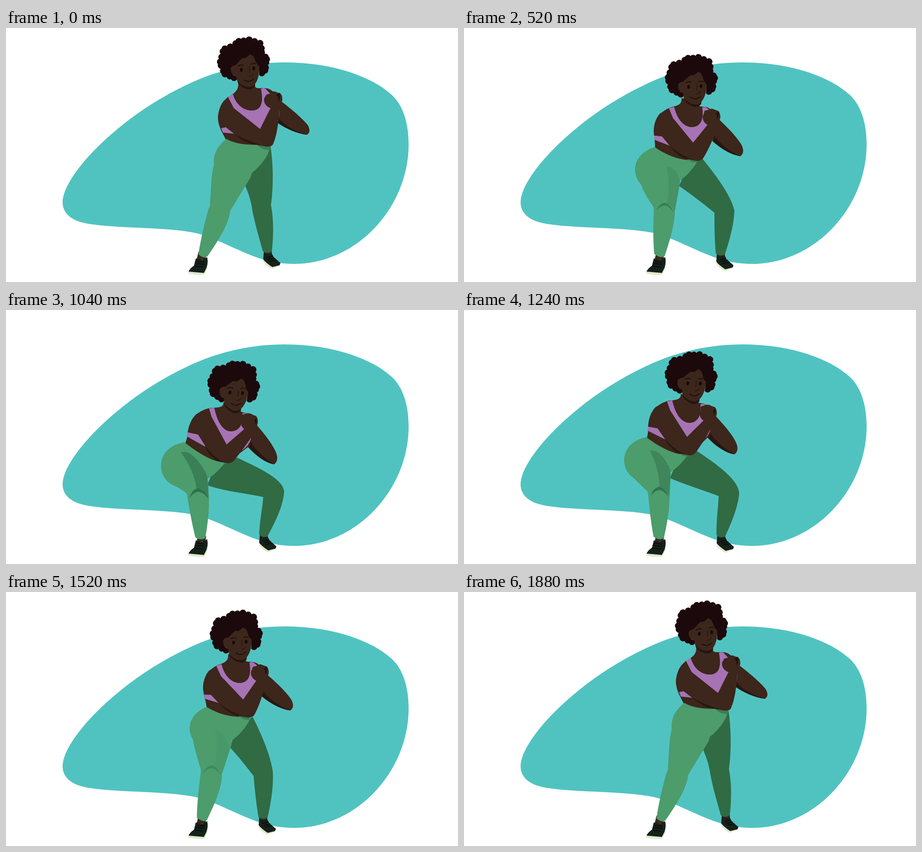
Write an HTML page that moves like this. It is 998 px wide and 561 px high and loops after 1.92 s.

```html
<!DOCTYPE html>
<html lang="en">
<head>
<meta charset="utf-8">
<title>Squat</title>
<style>
html, body { margin: 0; width: 100%; height: 100%; overflow: hidden; background: #fff; }
svg { display: block; width: 100vw; height: 100vh; }
</style>
</head>
<body>
<svg id="stage" viewBox="0 0 998 561">
  <path fill="#50c3c1" d="M125 385C125 325 250 195 400 125C470 91 545 76 615 76C708 76 800 101 851 147C878 171 889 213 889 257C889 395 776 521 636 521C555 521 510 483 434 457C370 436 215 446 160 427C135 418 125 402 125 385Z"/>
  <g id="backFoot">
    <path fill="#3d261b" d="M569 490H587V501H569Z"/>
    <path fill="#dcebc9" d="M568 510Q576 520 588 526L606 520V524L588 532Q576 528 568 516Z"/>
    <path fill="#16211a" d="M569 497Q578 501 587 498L591 506L606 519L604 524L588 528Q574 519 568 511Z"/>
    <path fill="none" stroke="#050a07" stroke-width="1.5" d="M576 507L590 504M579 511L594 508M582 515L598 512"/>
  </g>
  <g>
    <path fill="#3d261b" d="M425 494L421 511L440 512L442 500Z"/>
    <path fill="#dcebc9" d="M403 537L438 540L445 523L444 533L437 545Q418 546 402 542Z"/>
    <path fill="#16211a" d="M419 509L434 512L444 506Q447 517 443 529L437 541L403 538Q406 531 415 525Z"/>
    <path fill="none" stroke="#050a07" stroke-width="1.5" d="M421 515L438 517M419 520L438 522M416 526L435 528"/>
  </g>
  <g id="body"></g>
  <g id="head">
    <path fill="#25150f" d="M511 114L512 122Q522 134 537 136Q546 135 550 128V116Z"/>
    <path fill="#3d261b" d="M496 88Q493 98 503 104Q509 107 511 118Q525 132 540 130Q553 127 558 104L560 80L540 55L510 70Z"/>
    <path id="hair" fill="#1c090b"/>
    <g fill="#120a07">
      <ellipse cx="519.5" cy="92.5" rx="3" ry="4.2"/>
      <ellipse cx="547" cy="89" rx="3" ry="4.2"/>
    </g>
    <g fill="none" stroke="#160c08" stroke-linecap="round">
      <path stroke-width="1.8" d="M513 84Q518 80 524 82M541 80Q546 77 551 79"/>
      <path stroke-width="1" d="M537 85Q539 92 538 98M546 100Q545 106 537 107"/>
      <path stroke-width="1.7" d="M526 115Q538 122 547 112"/>
    </g>
  </g>
</svg>
<script>
const LOOP = 1920, STEP = 40;
const KEY_TIMES = [20, 280, 520, 840];
const SKIN = '#3d261b', SHADE = '#271710', PANTS = '#4c9c6c';
const $ = id => document.getElementById(id);

// Smooth curve through four key values, at rest at both ends.
function curve(v, time) {
  const k = KEY_TIMES, last = k.length - 1;
  if (time <= k[0]) return v[0];
  if (time >= k[last]) return v[last];
  const i = k.findIndex(x => x > time) - 1;
  const h = k[i + 1] - k[i], u = (time - k[i]) / h;
  const slope = j => j % last ? (v[j + 1] - v[j - 1]) / (k[j + 1] - k[j - 1]) : 0;
  return v[i] + u * u * (3 - 2 * u) * (v[i + 1] - v[i])
    + h * u * (1 - u) * ((1 - u) * slope(i) - u * slope(i + 1));
}

// Four poses: one for each key time. Two poses: upper body, upright and low.
const shapes = [];
function shape(fill, poses, opacity) {
  const el = document.createElementNS('http://www.w3.org/2000/svg', 'path');
  el.setAttribute('fill', fill);
  $('body').append(el);
  shapes.push({
    el, opacity, upper: poses.length === 2,
    letters: poses[0].match(/[A-Z]/g),
    sets: poses.map(p => p.match(/[A-Z][^A-Z]*/g).map(s => (s.match(/\d+/g) || []).map(Number)))
  });
}

// back leg
shape('#306b44', [
  'M584 260C590 300 591 350 585 391C591 420 591 460 587 493Q578 500 567 493C558 460 549 430 544 403C541 380 535 365 528 348L540 300Z',
  'M564 266C574 300 583 350 583 390C588 420 586 460 580 496Q570 502 560 496C553 465 546 430 542 405C533 382 524 362 513 342L525 300Z',
  'M526 288C550 318 588 365 597 403C596 435 586 470 576 500Q566 506 556 498C553 465 553 435 553 408C526 386 500 366 475 349L495 300Z',
  'M510 326C550 345 617 374 614 403C611 437 592 472 578 499Q568 505 559 496C560 465 566 440 568 413C525 404 485 401 444 387L460 350Z'
]);
// back arm and its shade
shape(SKIN, [
  'M605 160C625 175 650 195 666 214Q675 230 664 236C640 232 618 222 599 209L602 190Z',
  'M553 253C565 268 585 290 595 312Q604 332 592 341C572 337 552 322 534 302L541 278Z'
]);
shape(SHADE, [
  'M600 196C615 218 645 230 664 236C640 232 618 222 599 209Z',
  'M538 288C552 312 575 330 592 341C572 337 552 322 534 302Z'
]);
// torso
shape(SKIN, [
  'M513 118C513 130 513 138 499 147C478 158 468 180 468 200C470 222 479 232 487 250C510 262 540 264 584 262L602 195L602 165C598 145 585 133 573 133C562 132 550 136 549 126Z',
  'M480 204C480 212 478 216 452 216C425 222 413 235 407 252C402 268 402 278 395 297C415 322 445 336 490 336L538 300L541 272C545 240 540 232 528 227C522 226 516 226 514 214Z'
]);
// top
shape('#a673b5', [
  'M490 152L501 146C510 178 535 184 547 182C560 180 570 170 563 134Q568 132 573 134L583 145L603 180Q605 188 602 197L590 215L561 240L510 234L479 231L475 221L485 219L503 190Z',
  'M448 217L460 216C468 256 485 269 497 268C510 268 525 258 522 229Q525 227 529 228L540 232L541 276Q543 291 528 305L505 322L487 310L440 302L399 279L401 270L424 275L455 240Z'
]);
// hips and front leg
shape(PANTS, [
  'M487 245C505 256 530 258 553 258L584 262C578 285 562 305 543 320L540 330L495 404C492 435 465 475 445 504Q437 511 425 500C430 465 440 425 447 400L450 394C453 360 452 330 459 302C456 280 468 258 487 245Z',
  'M465 247C485 258 505 262 524 262L563 267C556 288 540 308 521 322L519 333L487 402C488 430 465 470 444 504Q437 510 423 498C427 465 434 425 440 399L442 393C440 362 436 335 436 310C426 282 442 260 465 247Z',
  'M421 263C445 280 470 289 493 292L516 294C505 312 492 326 477 337L476 347L466 404C464 440 454 470 443 504Q434 510 420 499C417 465 418 425 419 402L418 395C408 380 398 365 391 346C365 316 378 276 421 263Z',
  'M394 292C420 313 448 330 470 335L480 342C468 356 457 366 445 373L447 390L448 412C449 445 445 475 440 504Q430 510 418 502C410 470 404 435 400 409L398 404C390 399 382 392 371 388C329 370 330 302 394 292Z'
]);
// thigh shade
const thigh = 'M470 305Q488 310 495 328Q508 335 508 350L487 402Q476 385 470 384Q478 345 470 305Z';
shape('#3b7f57', [
  thigh, thigh,
  'M447 305Q466 308 472 326Q478 340 476 348L464 404Q456 388 449 386Q456 345 447 305Z',
  'M386 315Q404 308 425 335Q446 362 445 375L447 415Q437 396 421 396Q414 350 386 315Z'
], [0, 0, .35, 1]);
// knee fold
const knee = 'M443 397Q451 383 464 382Q476 382 483 404Q474 388 464 387Q452 388 443 397Z';
shape('#2f6f49', [
  knee, knee,
  'M425 403Q431 387 444 386Q456 388 462 407Q453 393 444 392Q433 393 425 403Z',
  'M405 416Q411 395 424 394Q438 396 447 417Q435 402 424 401Q412 404 405 416Z'
], [0, .2, .65, 1]);
// shade under the front arm
shape('#3c7d57', [
  'M553 257L584 262L582 269Q566 271 553 257Z',
  'M468 334L488 338L486 340Q475 339 468 334Z'
]);
shape(SHADE, [
  'M503 233C525 244 550 255 572 262L554 258C535 256 520 247 503 233Z',
  'M438 299C450 314 466 330 484 337L468 334C455 327 446 316 438 299Z'
]);
// front arm and folded hands
shape(SKIN, [
  'M490 152L503 177L561 223L584 177C570 172 567 158 572 152L575 147L583 145Q590 137 598 142L605 144Q611 148 610 160L604 180C602 200 600 235 589 258Q583 264 570 261C545 253 520 243 503 233L485 219L475 221C466 210 466 180 480 162Z',
  'M448 217L454 236L487 297L526 263C519 258 516 246 521 240L521 232L529 229Q537 226 546 232L552 234Q557 240 556 250L550 268C540 285 520 312 504 332Q496 341 482 337C466 330 450 314 441 302L424 275L401 270C404 255 408 242 420 230Z'
]);
shape('#1f120c', [
  'M596 148L605 143L605 156L602 163L601 152Z',
  'M549 243L553 237L553 247L549 253L550 244Z'
]);

// Curly rim of the hair: small arcs from notch to notch.
const curls = '497 113 487 108 476 101 474 90 468 80 470 68 474 57 476 45 488 40 500 36 507 27 519 24 530 23 544 24 556 28 567 38 570 49 571 57 580 63 581 74 578 82 579 92 572 101 559 104';
$('hair').setAttribute('d', 'M509 115' + curls.replace(/\d+ \d+/g, 'A7.5 7.5 0 0 1 $&')
  + 'L559 84Q551 78 550 70Q545 58 538 58Q531 68 522 66Q514 74 507 82Q500 82 496 89L497 97Q501 105 508 107Q511 112 509 115Z');

function draw(time) {
  const at = (...v) => curve(v, time);
  const lean = at(0, .2, .55, 1), dx = at(0, -4, -14.5, 0), dy = at(0, -12, -10.5, 0);
  for (const s of shapes) {
    const d = s.letters.map((letter, i) => letter + s.sets[0][i].map((a, j) => {
      const n = s.upper
        ? a + (s.sets[1][i][j] - a) * lean + (j % 2 ? dy : dx)
        : curve(s.sets.map(set => set[i][j]), time);
      return n.toFixed(2);
    }).join(' ')).join('');
    s.el.setAttribute('d', d);
    if (s.opacity) s.el.setAttribute('opacity', curve(s.opacity, time));
  }
  $('head').setAttribute('transform',
    `translate(${at(0, -8.5, -22.5, -22)} ${at(0, 6, 38, 91)}) rotate(${at(0, 2, 4, 10)} 525 75)`);
  $('backFoot').setAttribute('transform',
    `translate(${at(0, -8, -11, -9)} ${at(0, 2.5, 5, 3)})`);
}

function frame() {
  const t = Math.floor(performance.now() % LOOP / STEP) * STEP;
  draw(Math.min(t, LOOP - t));
  requestAnimationFrame(frame);
}
frame();
</script>
</body>
</html>
```
